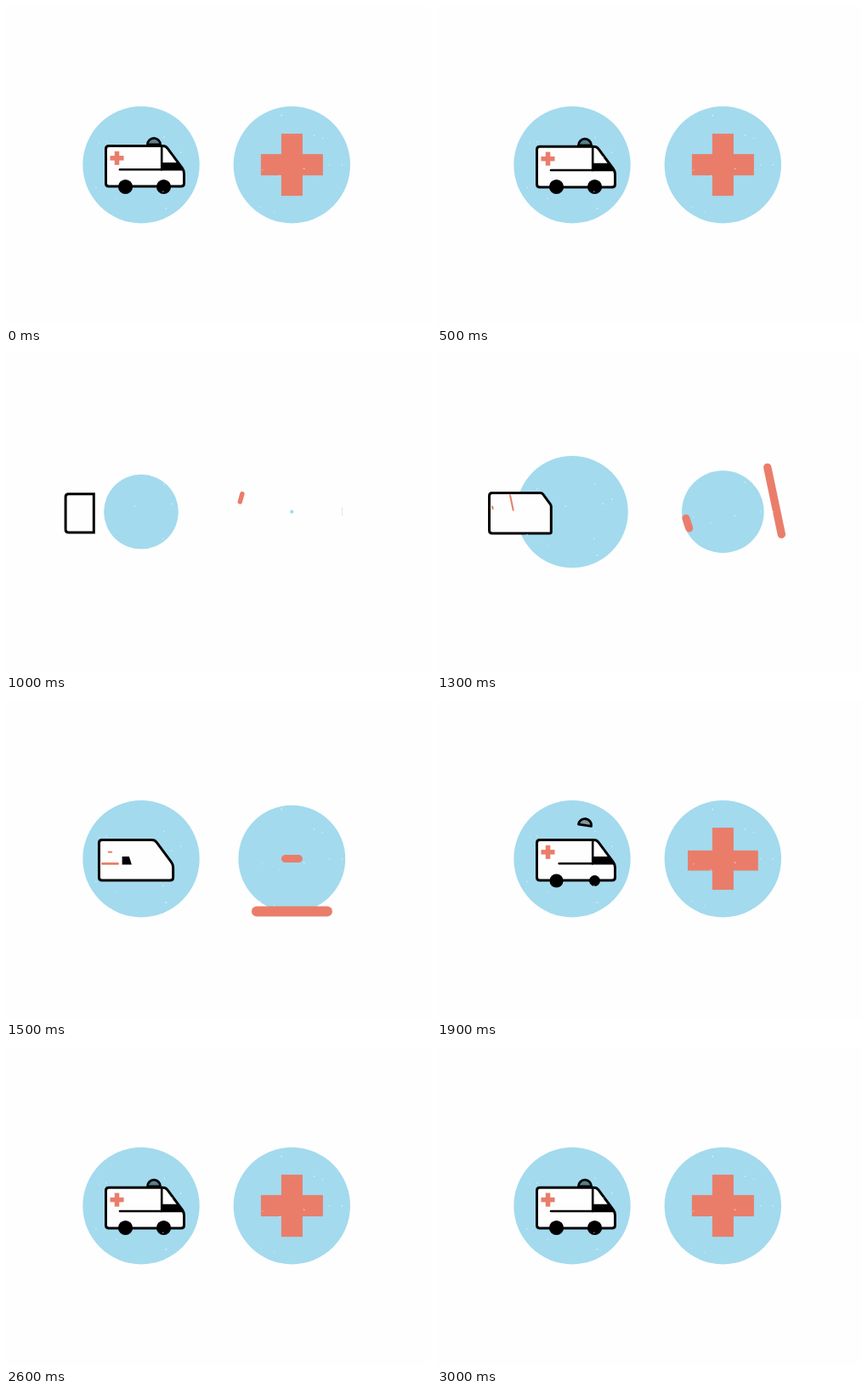
An HTML page that plays this animation: 500 by 375 pixels, repeating every 3100 ms.

```html
<!DOCTYPE html>
<html lang="en">
<head>
<meta charset="utf-8">
<title>Ambulance</title>
<style>
html, body { margin: 0; width: 100%; height: 100%; overflow: hidden; background: #fefefe; }
svg { display: block; width: 100vw; height: 100vh; }
</style>
</head>
<body>
<svg viewBox="0 0 500 375">
  <g fill="#a3daee">
    <circle id="discL" cx="159" cy="186.7"/>
    <circle id="discR" cx="336.3" cy="186.7"/>
  </g>
  <g id="van">
    <path id="siren" d="M-7.6 0A7.6 7.6 0 0 1 7.6 0Z" stroke="#000" stroke-width="2.8" stroke-linejoin="round"/>
    <path id="body" fill="#fefefe" stroke="#000"/>
    <path id="pane"/>
    <path id="trim" fill="none" stroke="#000" stroke-width="2.6" stroke-linecap="round"/>
    <path id="post" fill="none" stroke="#000" stroke-width="2.6"/>
    <g id="badge" fill="#ea7d6a"><rect/><rect/></g>
  </g>
  <circle id="wheelL" cx="140.5" cy="212.5"/>
  <circle id="wheelR" cx="185.5" cy="212.5"/>
  <g id="cross" fill="#ea7d6a"><rect/><rect/></g>
  <g id="grain" fill="#fefefe" opacity=".8"></g>
</svg>
<script>
const LOOP = 3100, STEP = 100, HOLD = 700;
const el = id => document.getElementById(id);
const set = (node, attrs) => { for (const k in attrs) node.setAttribute(k, attrs[k]); };
const show = (node, on) => set(node, { visibility: on ? "visible" : "hidden" });

const linear = x => x;
const smooth = x => x * x * (3 - 2 * x);
const out = power => x => 1 - Math.pow(1 - x, power);

// Goes from a to b between two times, and stays put outside them.
function tween(t, start, end, a, b, ease = linear) {
  const x = Math.min(1, Math.max(0, (t - start) / (end - start)));
  return a + (b - a) * ease(x);
}

// A rounded bar lying along a circle around the group's centre.
function bar(node, angle, orbit, len, thick, square) {
  const a = angle * Math.PI / 180;
  set(node, {
    x: -len / 2, y: -thick / 2, width: len, height: thick,
    rx: Math.min(len, thick, 12) / 2 * (1 - square),
    transform: `translate(${orbit * Math.cos(a)} ${orbit * Math.sin(a)}) rotate(${angle + 90})`
  });
}

// Two bars circle the centre, then fold into a cross.
function drawCross(group, t, x, y, scale) {
  const [wide, tall] = group.children;
  const square = tween(t, 1500, 1800, 0, 1);
  bar(wide,
    tween(t, 970, 1500, 180, 450),
    tween(t, 1500, 1950, 62, 0, smooth),
    tween(t, 970, 1500, 0, 95, out(3)) - tween(t, 1650, 2100, 0, 22),
    tween(t, 970, 1500, 5, 12) + tween(t, 1500, 2000, 0, 13, smooth),
    square);
  bar(tall,
    tween(t, 1000, 1500, 0, 270),
    tween(t, 1200, 1500, 59, 0, smooth),
    tween(t, 1000, 1400, 10, 25),
    tween(t, 990, 1300, 0, 9) + tween(t, 1500, 1900, 0, 64, smooth),
    square);
  set(group, { transform: `translate(${x} ${y}) scale(${scale})` });
}

// The box swings out to the left, widens and gets its sloping nose on the way back.
function drawBody(t) {
  const l = tween(t, 700, 1222, 173.2, 61.5, out(3)) + tween(t, 1300, 1720, 0, 56, out(3));
  const r = l + tween(t, 700, 1000, 1.6, 33.2) + tween(t, 1000, 1700, 0, 58.8, out(2));
  const half = tween(t, 700, 1017, 1.5, 23.8);
  const slant = tween(t, 1100, 1500, 0, 1);
  const top = 188.3 - half, low = 188.3 + half;
  const c = Math.min(3.5, half / 3, (r - l) / 3), k = c * slant;
  const nose = r - 21.5 * slant, brow = top + 29 * slant;
  set(el("body"), {
    d: `M${l + c} ${top}H${nose - k}Q${nose} ${top} ${nose + k * .6} ${top + k * .8}` +
       `L${r - k * .6} ${brow - k * .8}Q${r} ${brow} ${r} ${brow + k}` +
       `V${low - k}Q${r} ${low} ${r - k} ${low}H${l + c}Q${l} ${low} ${l} ${low - c}` +
       `V${top + c}Q${l} ${top} ${l + c} ${top}Z`,
    "stroke-width": tween(t, 700, 900, 1.8, 3)
  });
  return l;
}

function drawSiren(t, odd) {
  const fall = tween(t, 1600, 2020, 108, 163);
  const bounce = Math.sin(Math.PI * tween(t, 2100, 2500, 0, 1));
  const tilt = tween(t, 1900, 2100, 8, 0) + 5 * bounce;
  set(el("siren"), {
    transform: `translate(174 ${fall - 3.5 * bounce}) rotate(${tilt}) scale(${tween(t, 1600, 1800, 0, 1)})`,
    fill: t < 2200 ? "#84989c" : t < 2500 ? "#707575" : odd ? "#617f8a" : "#55808f"
  });
}

function drawVan(t) {
  const odd = t / STEP % 2 === 1;
  const left = drawBody(t);
  drawSiren(t, odd);

  const x = tween(t, 1300, 1800, 112, 182, smooth);
  const grow = tween(t, 1300, 1800, 0, 1);
  set(el("pane"), { d: `M${x} 184h${20.5 * grow}L${x + 28 * grow} 193.5H${x}Z` });

  set(el("trim"), { d: `M${tween(t, 1700, 1950, 183, 134)} 192.2H183` });
  set(el("post"), { d: `M183.2 193V${tween(t, 1600, 1800, 192, 164.5)}` });
  show(el("trim"), t > 1700);
  show(el("post"), t > 1700);

  show(el("badge"), t > 1250);
  drawCross(el("badge"), t + Math.max(0, t - 1500) / 2, left + 13, 178.8, .22);

  // The body idles on its wheels.
  set(el("van"), { transform: `translate(0 ${t >= 2400 && !odd ? .8 : 0})` });
  set(el("wheelL"), { r: tween(t, 1600, 2000, 0, 8.6, out(2)) });
  set(el("wheelR"), { r: tween(t, 1700, 2100, 0, 8.6, out(2)) });
}

function draw(t) {
  set(el("discL"), { r: tween(t, 700, 1457, .6, 68.7, out(2)) });
  set(el("discR"), { r: tween(t, 990, 1820, 0, 68.7, out(2.6)) });
  drawVan(t);
  drawCross(el("cross"), t, 336.4, 186.6, 1);
}

// Worn-print specks scattered over both discs.
let seed = 11;
const random = () => (seed = seed * 16807 % 2147483647) / 2147483647;
for (let i = 0; i < 20; i++) {
  const a = random() * 2 * Math.PI, d = 66 * Math.sqrt(random());
  const x = (i % 2 ? 159 : 336.3) + d * Math.cos(a), y = 186.7 + d * Math.sin(a);
  const dot = document.createElementNS("http://www.w3.org/2000/svg", "ellipse");
  set(dot, {
    rx: .5 + .7 * random(), ry: .5,
    transform: `translate(${x} ${y}) rotate(${random() * 180})`
  });
  el("grain").append(dot);
}

const origin = performance.now();
function tick() {
  const t = Math.floor((performance.now() - origin) % LOOP / STEP) * STEP;
  draw(t < HOLD ? t + LOOP : t);
  requestAnimationFrame(tick);
}
tick();
</script>
</body>
</html>
```
